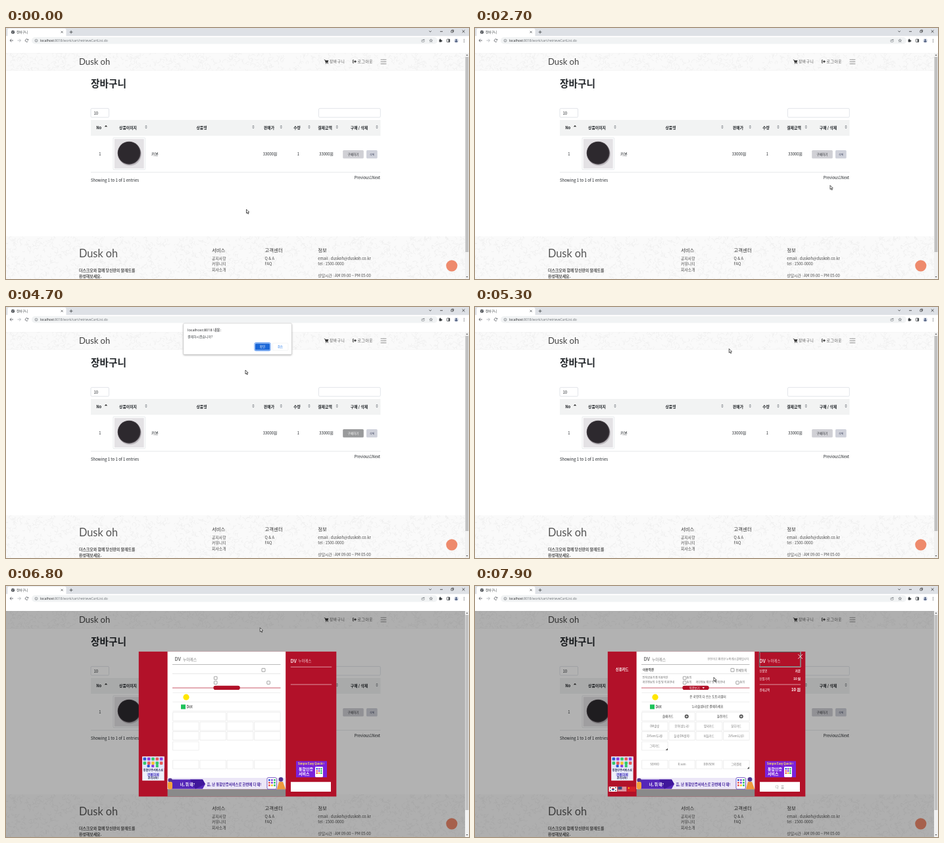
Animation of 704 by 382 pixels, one loop 8 s. Source, as an HTML page with a canvas:

```html
<!DOCTYPE html>
<html lang="ko">
<head>
<meta charset="utf-8">
<title>장바구니</title>
<style>
html, body { margin: 0; width: 100%; height: 100%; overflow: hidden; background: #fff; }
canvas { display: block; width: 704px; height: 382px; }
</style>
</head>
<body>
<canvas id="stage"></canvas>
<script>
const W = 704, H = 382, LOOP = 8000, STEP = 100;
const KR = '"Noto Sans CJK KR", "Noto Sans KR", "Noto Sans CJK JP", "Noto Sans", sans-serif';
const UI = '"Open Sans", "Noto Sans CJK KR", "Noto Sans", sans-serif';
const LOGO = 'Lato, "Open Sans", sans-serif';
const RED = '#b21129';
const scale = Math.max(1, window.devicePixelRatio || 1);

function setup(c) {
  c.width = W * scale;
  c.height = H * scale;
  const g = c.getContext('2d');
  g.scale(scale, scale);
  return g;
}

const stage = document.getElementById('stage');
const screen = setup(stage);
let ctx = screen;

// ---- drawing helpers ----
function rect(x, y, w, h, fill) {
  ctx.fillStyle = fill;
  ctx.fillRect(x, y, w, h);
}

function box(x, y, w, h, r, fill, stroke, lw = 0.5) {
  ctx.beginPath();
  ctx.roundRect(x, y, w, h, r);
  if (fill) { ctx.fillStyle = fill; ctx.fill(); }
  if (stroke) { ctx.strokeStyle = stroke; ctx.lineWidth = lw; ctx.stroke(); }
}

function disc(x, y, r, fill) {
  ctx.beginPath();
  ctx.arc(x, y, r, 0, 7);
  ctx.fillStyle = fill;
  ctx.fill();
}

function ring(x, y, r, color, lw = 0.6, from = 0, to = 6.3) {
  ctx.beginPath();
  ctx.arc(x, y, r, from, to);
  ctx.strokeStyle = color;
  ctx.lineWidth = lw;
  ctx.stroke();
}

function trace(pts) {
  ctx.beginPath();
  for (let i = 0; i < pts.length; i += 2) ctx.lineTo(pts[i], pts[i + 1]);
}

function line(color, lw, ...pts) {
  trace(pts);
  ctx.strokeStyle = color;
  ctx.lineWidth = lw;
  ctx.stroke();
}

function poly(color, ...pts) {
  trace(pts);
  ctx.closePath();
  ctx.fillStyle = color;
  ctx.fill();
}

// y is the visual middle of the line
function text(s, x, y, size, color, { align = 'left', weight = 400, font = KR, gap = 0 } = {}) {
  ctx.font = `${weight} ${size}px ${font}`;
  ctx.letterSpacing = gap + 'px';
  ctx.textAlign = align;
  ctx.fillStyle = color;
  ctx.fillText(s, x, y + size * 0.37);
}

const mid = (s, x, y, size, color, weight = 400) => text(s, x, y, size, color, { align: 'center', weight });

function random(seed) {
  return () => (seed = (seed * 16807) % 2147483647) / 2147483647;
}

// pale leafy texture
function texture(y, h, seed) {
  const rnd = random(seed);
  ctx.save();
  ctx.beginPath();
  ctx.rect(0, y, 698, h);
  ctx.clip();
  rect(0, y, 698, h, '#fafafa');
  for (let i = 0; i < h * 26; i++) {
    const a = rnd() * 6.28;
    ring(rnd() * 700, y + rnd() * h, 1.5 + rnd() * 3, '#efefef', 0.8, a, a + 1 + rnd() * 1.5);
  }
  ctx.restore();
}

// ---- browser frame ----
function browser() {
  const ink = '#3c4043';
  rect(0, 0, W, 12.5, '#dee1e6');
  box(2.5, 0.8, 89, 14, 2.5, '#fff');
  rect(0, 12.3, W, 25.7, '#fff');
  disc(10.5, 6.2, 2.6, '#4d5156');
  line('#fff', 0.5, 8.6, 5.4, 10.6, 6.4, 10, 8.2);
  line('#fff', 0.5, 10.8, 4.2, 12.3, 6);
  text('장바구니', 16, 6.3, 4.7, ink);
  line(ink, 0.7, 83.6, 4.7, 86.6, 7.7);
  line(ink, 0.7, 86.6, 4.7, 83.6, 7.7);
  line(ink, 0.8, 96.6, 6.2, 101.4, 6.2);
  line(ink, 0.8, 99, 3.8, 99, 8.6);
  line('#222', 0.7, 643.4, 4.4, 645.1, 6, 646.8, 4.4);
  line('#222', 0.7, 660, 5.3, 664, 5.3);
  box(676.8, 4, 2.8, 2.8, 0, null, '#222', 0.6);
  line('#222', 0.6, 677.8, 4, 677.8, 3, 680.6, 3, 680.6, 5.8, 679.6, 5.8);
  line('#222', 0.7, 693.7, 3.3, 697.5, 7.1);
  line('#222', 0.7, 697.5, 3.3, 693.7, 7.1);

  line('#50545a', 0.8, 11, 19, 6, 19);
  line('#50545a', 0.8, 8.3, 16.7, 6, 19, 8.3, 21.3);
  line('#a9adb2', 0.8, 17.5, 19, 22.5, 19);
  line('#a9adb2', 0.8, 20.2, 16.7, 22.5, 19, 20.2, 21.3);
  ring(31.5, 19, 2.2, '#50545a', 0.8, 0.5, 5.6);
  poly('#50545a', 32, 18.6, 34.2, 18.6, 34.2, 16.4);

  box(39, 14, 617, 10.2, 5.1, '#f1f3f4');
  ring(46, 19.2, 2, '#5f6368');
  line('#5f6368', 0.6, 46, 18.9, 46, 20.3);
  const url = { font: UI };
  text('localhost', 52, 19.2, 5, '#202124', url);
  const w = ctx.measureText('localhost').width;
  text(':8018/work/cart/retrieveCartList.do', 52 + w, 19.2, 5, '#6b6f74', url);

  box(632, 18.2, 4, 3, 0.4, null, '#5f6368');
  line('#5f6368', 0.6, 633.5, 19.4, 634.6, 17.5, 636.6, 17.5);
  const star = [];
  for (let i = 0; i < 10; i++) {
    const r = i % 2 ? 1.1 : 2.5, a = i * Math.PI / 5 - Math.PI / 2;
    star.push(646.2 + r * Math.cos(a), 19.3 + r * Math.sin(a));
  }
  line('#5f6368', 0.6, ...star, star[0], star[1]);
  rect(658.6, 17.8, 3.6, 3.6, ink);
  disc(660.2, 17.4, 0.9, ink);
  disc(662.6, 19.6, 0.9, ink);
  box(670.3, 17, 4.4, 4.4, 0.5, null, ink, 0.7);
  rect(672.7, 17, 2, 4.4, ink);
  disc(684.6, 19.2, 3.3, '#d5dbe6');
  disc(684.6, 18.2, 1.1, '#3f4f73');
  box(682.6, 19.6, 4, 1.9, 0.9, '#3f4f73');
  for (const y of [17.2, 19.2, 21.2]) disc(696.5, y, 0.55, ink);
}

function scrollbar() {
  rect(698, 38, 6, 344, '#f1f1f1');
  rect(698.5, 44, 4.8, 297, '#c1c1c1');
  poly('#555', 699.5, 42, 702.5, 42, 701, 40.2);
  poly('#555', 699.5, 378, 702.5, 378, 701, 379.8);
}

// ---- shop page ----
function sorter(x) {
  poly('#8b8f94', x - 1.9, 150, x + 1.9, 150, x, 148);
  poly('#8b8f94', x - 1.9, 151.2, x + 1.9, 151.2, x, 153.2);
}

function siteHeader() {
  texture(38, 27, 11);
  rect(0, 37.6, 698, 0.6, '#e3e3e3');
  rect(0, 64.6, 698, 0.5, '#efefef');
  text('Dusk oh', 111, 51, 13, '#444', { font: LOGO });
  const c = '#333';
  line(c, 0.8, 483.8, 48.6, 485.2, 48.6, 486.2, 52.6, 489.6, 52.6);
  poly(c, 485.3, 49.2, 490.4, 49.2, 489.6, 52, 486, 52);
  disc(486.7, 53.7, 0.7, c);
  disc(489.2, 53.7, 0.7, c);
  text('장바구니', 492, 51.2, 5.87, '#555', { gap: 0.45 });
  line(c, 0.8, 529, 48.8, 527.4, 48.8, 527.4, 53.2, 529, 53.2);
  rect(528.6, 50.3, 2.2, 1.4, c);
  poly(c, 530.6, 48.8, 533, 51, 530.6, 53.2);
  text('로그아웃', 534.5, 51.2, 5.87, '#555', { gap: 0.45 });
  for (const y of [48.2, 51.4, 54.6]) line('#666', 0.7, 569.6, y, 578.4, y);
}

function cart() {
  const ink = '#212529';
  text('장바구니', 129, 85, 14.67, ink, { weight: 700 });
  box(129, 122.4, 27.5, 13.6, 1.6, '#fff', '#cfd4da', 0.6);
  text('10', 133.6, 129.6, 5.87, ink);
  box(475.5, 122.4, 93.8, 13.6, 1.6, '#fff', '#cfd4da', 0.6);

  rect(129, 140, 440.5, 24, '#f2f3f3');
  const heads = [['No', 141.2], ['상품이미지', 185.5], ['상품명', 297.5], ['판매가', 400],
    ['수량', 442.6], ['결제금액', 485], ['구매 / 삭제', 537]];
  for (const [s, x] of heads) mid(s, x, 152.3, 5.87, ink, 700);
  poly('#222', 149.8, 150.2, 154.2, 150.2, 152, 147.9);
  [213, 376, 418.3, 461, 503.3, 564].forEach(sorter);

  mid('1', 143, 192.2, 5.87, ink);
  box(163, 167, 48.6, 48.6, 1, '#fff', '#d9dde1', 0.6);
  rect(164.8, 168.8, 45, 45, '#e4e2e5');
  disc(188.2, 192, 17.6, '#bcb8bd');
  disc(187.2, 190.2, 17.5, '#4a444a');
  disc(187, 190, 16.6, '#2d292e');
  text('카본', 221, 192.2, 5.87, ink);
  text('33000원', 390.8, 192.2, 5.87, ink);
  mid('1', 444.3, 192.2, 5.87, ink);
  mid('33000원', 487, 192.2, 5.87, ink);
  rect(129, 219.3, 440.5, 0.6, '#d9dcdf');
  text('Showing 1 to 1 of 1 entries', 129, 231.4, 6, ink);
  text('Previous1Next', 569, 228.2, 5.87, ink, { align: 'right' });
  box(548, 186, 16.7, 12.6, 1.5, '#cfd1da');
  mid('삭제', 556.4, 192.4, 3.8, '#333a55');
}

function footer() {
  texture(317, 65, 77);
  const c = '#4a4a4a';
  text('Dusk oh', 111, 343, 16.3, '#555', { font: LOGO });
  text('더스크오와 함께 당신만의 팔레트를', 111, 368.4, 5.9, c, { weight: 700 });
  text('완성해보세요.', 111, 377.4, 5.9, c, { weight: 700 });
  const cols = [
    [313, '서비스', ['공지사항', '커뮤니티', '회사소개']],
    [393.5, '고객센터', ['Q & A', 'FAQ']],
    [474.3, '정보', ['email : duskoh@duskoh.co.kr', 'tel : 1500-0000', '', '상담시간 : AM 09:00 ~ PM 05:00']],
  ];
  for (const [x, head, rows] of cols) {
    text(head, x, 338.5, 7.4, '#333', { weight: 500 });
    rows.forEach((s, i) => text(s, x, 350.4 + i * 8.75, 5.87, c));
  }
  disc(677.8, 361.8, 8.6, '#ee8a6c');
}

const still = document.createElement('canvas');
ctx = setup(still);
rect(0, 0, W, H, '#fff');
siteHeader();
cart();
footer();
browser();
scrollbar();
ctx = screen;

function buyButton(t) {
  const down = t >= 3500 && t < 5200, over = t >= 3100 && t < 3500;
  box(512.2, 186, 31.6, 12.6, 1.5, down ? '#999a9b' : over ? '#b3b3b7' : '#d0d0d5');
  mid('구매하기', 528, 192.4, 4.6, down ? '#fff' : '#2b2d33');
}

// ---- confirm dialog ----
function confirmBox(alpha) {
  if (alpha <= 0) return;
  ctx.save();
  ctx.globalAlpha = alpha;
  ctx.save();
  ctx.shadowColor = 'rgba(0,0,0,.35)';
  ctx.shadowBlur = 3 * scale;
  ctx.shadowOffsetY = scale;
  box(269.8, 25, 164.6, 47.3, 1.4, '#fff');
  ctx.restore();
  box(269.8, 25, 164.6, 47.3, 1.4, null, '#c4c4c4', 0.5);
  text('localhost:8018 내용:', 276, 35, 5.6, '#202124', { font: UI });
  text('결제하시겠습니까?', 276, 45, 4.9, '#3c4043');
  box(378, 54.4, 24, 12.2, 1.8, '#fff', '#4a8df0', 1);
  box(379, 55.4, 22, 10.2, 1.2, '#1a67d8');
  mid('확인', 390, 60.6, 4.6, '#fff');
  box(405.5, 55, 23.5, 11, 1.4, '#fff', '#e6e8eb', 0.5);
  mid('취소', 417, 60.6, 4.4, '#1a73e8');
  ctx.restore();
}

// ---- payment window ----
const CELL_X = [253.6, 295, 336.2, 377.6];

function cell(x, y, w = 39.6, h = 13) {
  box(x, y, w, h, 0, '#fff', '#dcdcdc', 0.5);
}

function check(x, y, s = 4.6) {
  box(x, y, s, s, 0.6, '#fff', '#666', 0.6);
}

function tiles(x, y, cols, rows, size, pitch) {
  const hues = ['#3157d6', '#35c66b', '#f4c531', '#8a3fe0', '#e85a5a'];
  for (let i = 0; i < cols * rows; i++) {
    box(x + (i % cols) * pitch, y + Math.floor(i / cols) * pitch, size, size, size / 4, hues[(i * 3 + (i >> 2)) % 5]);
  }
}

function sideAd() {
  rect(207.2, 259.6, 33.4, 36.6, '#eef0fb');
  rect(207.2, 259.6, 33.4, 17.5, '#dfe5fa');
  tiles(208.6, 261, 5, 2, 4.6, 6.3);
  tiles(214.6, 272, 3, 1, 4, 6.6);
  mid('통합인증서비스로', 223.9, 280.8, 4.1, '#23285a', 700);
  box(214.2, 283.8, 19.4, 5.8, 0.5, '#d5d6f6');
  mid('간편하게', 223.9, 286.8, 4.7, '#3b2bb4', 700);
  mid('관리하자!', 223.9, 292.6, 4, '#23285a', 700);
}

function wideAd() {
  rect(245.6, 292, 179.6, 17.2, '#ece7f7');
  poly('#5526b8', 252, 294.5, 299, 294.5, 303, 301.6, 299, 308.8, 252, 308.8);
  poly('#3f179b', 280, 294.5, 299, 294.5, 303, 301.6, 288, 308.8);
  disc(249.6, 295.6, 3.2, '#52348f');
  box(246, 298, 7, 11.2, 2.5, '#f2a23c');
  text('너, 뭐 돼?', 264.5, 301.8, 5.6, '#fff', { weight: 700 });
  text('음, 난 통합인증서비스로 한번에 다 돼!', 305.5, 301.8, 5.3, '#43229e', { weight: 700 });
  box(397, 291.6, 14.4, 17.6, 2, '#fff', '#5a37b7', 0.8);
  tiles(399, 294, 3, 3, 2.8, 4);
  disc(418, 294.4, 3.3, '#4f3590');
  poly('#ee9a3d', 412, 309.2, 415, 298, 421, 298, 425.2, 309.2);
}

function bannerAd() {
  rect(441, 266.4, 47, 24.8, '#7a22dc');
  mid('Simple Easy Quick!!', 464, 270.8, 4.1, '#ffe95a', 700);
  text('통합인증', 445, 278.8, 6, '#fff', { weight: 700 });
  text('서비스', 445, 286, 6, '#fff', { weight: 700 });
  box(470, 275, 12, 16, 1.4, '#fff');
  tiles(471.6, 277, 3, 3, 2.4, 3.3);
}

function flags() {
  const y = 305.4, h = 7.6;
  rect(203.6, y, 12.6, h, '#fff');
  ring(209.9, y + 3.8, 1, '#cd2e3a', 2, Math.PI, 6.28);
  ring(209.9, y + 3.8, 1, '#0047a0', 2, 0, Math.PI);
  for (const [x, dy] of [[205, 1], [213, 1], [205, 5.2], [213, 5.2]]) rect(x, y + dy, 1.6, 1.3, '#222');
  rect(217.4, y, 12.8, h, '#f3eeee');
  for (let i = 0; i < 4; i++) rect(217.4, y + i * 2.1, 12.8, 1.1, '#c5394c');
  rect(217.4, y, 6, 4.2, '#34417a');
  rect(231.4, y, 12.8, h, '#d51f26');
  disc(233.8, y + 2.2, 1, '#ffde00');
}

function payFrame() {
  rect(201.8, 99.8, 300.5, 220.6, RED);
  rect(245.6, 99.8, 179.6, 209.4, '#fff');
  rect(245.6, 309.2, 179.6, 11.2, '#8a8a8a');
  text('DV', 256.5, 111.3, 7.2, '#777', { weight: 700 });
  text('누마레스', 269, 111.4, 5.7, '#777');
  rect(253, 119, 164.5, 0.6, '#8d8d8d');
  rect(253, 133.2, 164.5, 0.5, '#cfcfcf');
  check(389, 125.4, 5);
  check(316.4, 137.8);
  check(316.4, 144.8);
  check(396.8, 144.8);
  rect(253, 154.7, 164.5, 0.7, RED);
  box(315.4, 151.8, 40.4, 6.2, 3.1, RED);
  for (const y of [162.2, 176.2, 190.4]) rect(253.4, y, 164, 0.5, '#dcdcdc');
  disc(274, 169.2, 4.6, '#ffe600');
  rect(266, 180.4, 7, 7, '#1ec25a');
  text('Dot', 274.4, 184, 5.6, '#222');
  cell(253.6, 192.4, 81, 12.8);
  cell(336.2, 192.4, 81, 12.8);
  for (const x of CELL_X) [207, 221.6, 265.2].forEach(y => cell(x, y));
  cell(CELL_X[0], 237);
  sideAd();
  wideAd();
  text('DV', 432.6, 114.2, 7, '#f4d9de', { weight: 700 });
  text('누마레스', 444.6, 114.3, 5.4, '#f4d9de');
  rect(432.8, 122.8, 62.4, 0.7, '#eed0d5');
  rect(432.8, 149.6, 62.4, 0.7, '#eed0d5');
  bannerAd();
  rect(433, 298.2, 61, 14.8, '#fff');
}

function payText() {
  const ink = '#333', soft = '#666';
  text('안전하고 편리한 누마레스결제입니다.', 417.5, 111.2, 4.15, '#777', { align: 'right' });
  text('이용약관', 255, 127.6, 4.6, ink, { weight: 700 });
  text('전체동의', 396.6, 127.8, 4.6, soft);
  text('전자금융거래 이용약관', 254.6, 139.6, 4.15, soft);
  text('동의', 321.8, 139.8, 4.15, soft);
  text('개인정보의 수집 및 이용안내', 254.6, 146.6, 4.15, soft);
  text('동의', 321.8, 146.8, 4.15, soft);
  text('개인정보 제공 및 위탁안내', 335.4, 146.6, 4.15, soft);
  text('동의', 402.4, 146.8, 4.15, soft);
  mid('약관보기', 333.8, 154.9, 4.4, '#fff');
  poly('#fff', 345.6, 153.9, 349, 153.9, 347.3, 156.3);
  mid('온 국민이 다 쓰는 도토리셈터', 354, 168.7, 4.65, ink, 500);
  mid('누리솔셈터로 결제하세요', 353.6, 183.4, 4.6, ink, 500);
  for (const [s, x] of [['솔매카드', 293.4], ['들찬카드', 376.4]]) {
    mid(s, x, 198.8, 4.5, ink, 500);
    disc(x + 28.4, 198.6, 3, '#555');
    line('#fff', 0.7, x + 26.8, 198.6, x + 30, 198.6);
    line('#fff', 0.7, x + 28.4, 197, x + 28.4, 200.2);
  }
  const rows = [
    [213.6, 'DM솔빛', '모아(셈누리)', '별뫼카드', '달무카드'],
    [228.2, '2VSem(두레)', '들녘(DN셈이)', '버들카드', '2VSem(나루)'],
    [243.6, '그외카드'],
    [271.8, 'SEMVO', 'R.sem', 'DDVSEM', '그외결제'],
  ];
  for (const [y, ...names] of rows) names.forEach((s, i) => mid(s, CELL_X[i] + 19.6, y, 4.2, '#777'));
  poly('#555', 293, 246.8, 293, 250, 289.8, 250);
  poly('#555', 417, 275, 417, 278.2, 413.8, 278.2);
  mid('신용카드', 223.6, 127.4, 5.4, '#fff', 700);
  const bill = [['상품명', '카본', 129.4, 4.3], ['상품가격', '10 원', 141.2, 4.6], ['결제금액', '10 원', 158, 6]];
  for (const [k, v, y, size] of bill) {
    text(k, 432.6, y, 4.2, '#fff', { weight: 500 });
    text(v, 495, y, size, '#fff', { align: 'right', weight: 700 });
  }
  mid('다   음', 463.5, 305.8, 5.2, '#888');
}

function payWindow(t) {
  payFrame();
  if (t >= 6900) payText();
  if (t >= 7000) flags();
  if (t >= 7100) {
    box(432.6, 100.4, 62.4, 22.4, 0.6, null, '#fff', 1.4);
    box(432.6, 100.4, 62.4, 22.4, 0.6, null, '#111', 0.8);
    line('#fff', 0.8, 491.2, 104, 498, 110.8);
    line('#fff', 0.8, 498, 104, 491.2, 110.8);
  }
}

// ---- pointer ----
const route = [
  [1700, 365.5, 276], [1900, 415, 283], [2200, 520, 291], [2400, 553, 286], [2500, 553, 286],
  [2700, 540, 239.5], [3000, 537.5, 206], [3200, 535, 192], [3400, 536.3, 195], [4100, 536.3, 195],
  [4300, 480, 178], [4500, 385, 140], [4600, 359, 122], [4700, 364, 96], [4900, 386.3, 63.6],
  [7200, 386.3, 63.6], [7500, 381, 92], [7900, 363, 139],
];

function pointerAt(t) {
  if (t <= route[0][0]) return route[0].slice(1);
  const i = route.findIndex(k => k[0] >= t);
  const [t0, x0, y0] = route[i - 1], [t1, x1, y1] = route[i];
  const k = (t - t0) / (t1 - t0);
  return [x0 + (x1 - x0) * k, y0 + (y1 - y0) * k];
}

function outlined(pts) {
  trace(pts);
  ctx.closePath();
  ctx.fillStyle = '#fff';
  ctx.fill();
  ctx.strokeStyle = '#111';
  ctx.lineWidth = 0.7;
  ctx.lineJoin = 'round';
  ctx.stroke();
}

function pointer(t) {
  const [x, y] = pointerAt(t);
  ctx.save();
  ctx.translate(x, y);
  if (t >= 3100 && t < 4200) {
    outlined([-0.7, 0, 0.6, 0, 0.7, 3, 4, 3.8, 4.2, 6, 3.2, 8.2, 0, 8.2, -2.4, 5, -1.8, 4.2, -0.7, 5]);
  } else {
    outlined([0, 0, 0, 6, 1.4, 4.8, 2.4, 7, 3.4, 6.6, 2.4, 4.4, 4.2, 4.2]);
  }
  ctx.restore();
}

function draw(t) {
  ctx.drawImage(still, 0, 0, W, H);
  buyButton(t);
  confirmBox(Math.min(1, (t - 3400) / 300, (5300 - t) / 300));
  if (t >= 5700) rect(0, 38, 698, 344, 'rgba(0,0,0,.3)');
  if (t >= 6800) payWindow(t);
  pointer(t);
}

let last = -1;
function tick(now) {
  const t = Math.floor((now % LOOP) / STEP) * STEP;
  if (t !== last) draw(last = t);
  requestAnimationFrame(tick);
}
draw(0);
requestAnimationFrame(tick);
</script>
</body>
</html>
```
